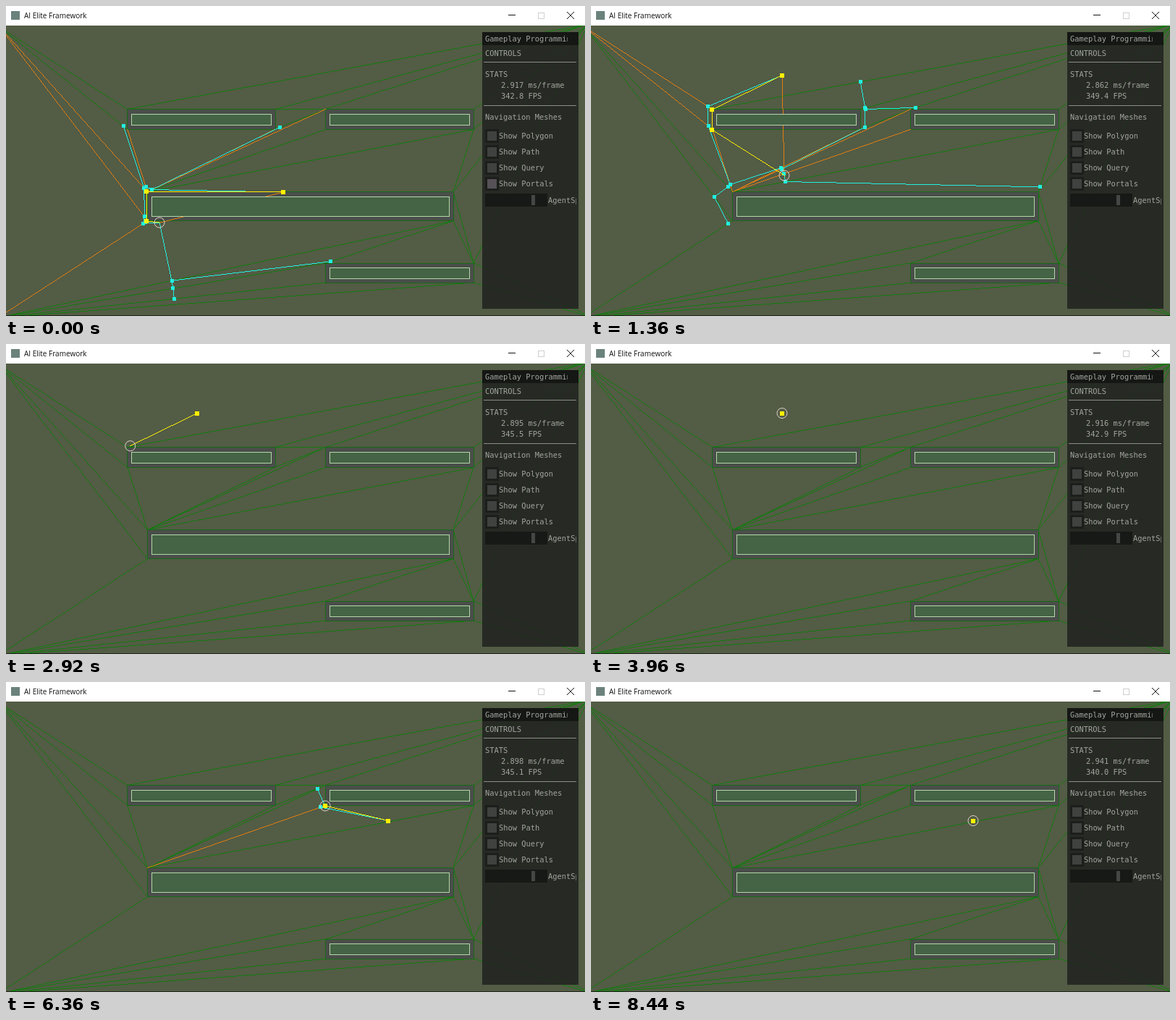
Animation of 800 by 428 pixels, one loop 8.48 s. Source, as an HTML page with a canvas:

```html
<!DOCTYPE html>
<html lang="en">
<head>
<meta charset="utf-8">
<title>AI Elite Framework</title>
<style>
  html, body { margin: 0; width: 100%; height: 100%; overflow: hidden; background: #535c45; }
  canvas { display: block; width: 800px; height: 428px; }
</style>
</head>
<body>
<canvas id="stage" width="800" height="428"></canvas>
<script>
const ctx = document.getElementById('stage').getContext('2d');
const LOOP = 8480, STEP = 40, RADIUS = 7;
const MONO = '10.4px "DejaVu Sans Mono", monospace';
const CYAN = '#20f0e0', YELLOW = '#fff000', ORANGE = '#e07d10', GREEN = '#147a10';

// Navigation mesh: world corners w, obstacle corners a to d, all clockwise from top left
const verts = { w0: [-10, 28], w1: [804, 25], w2: [810, 430], w3: [-10, 430] };
const obstacles = {
  a: [167.5, 142.5, 372, 170], b: [441.5, 142.5, 646, 170.5],
  c: [195.5, 256.5, 618, 296.5], d: [441.5, 355, 646, 382]
};
for (const [k, [l, t, r, b]] of Object.entries(obstacles)) {
  [[l, t], [r, t], [r, b], [l, b]].forEach((p, i) => verts[k + i] = p);
}
const meshEdges = ('w0a0 w0a3 w0c0 w0c3 a0w1 a1w1 a1b0 b0w1 b1w1 b2w1 a2b0 a3c0 c0a2 c0b0 c0b3 c0b2 c1b2 ' +
  'c1w1 c1d1 c2d1 d1w1 d1w2 d2w2 w3c3 w3c2 c2d0 w3d0 w3d3 w3d2 w3w2').split(' ');

// Agent position over time: ms, x, y
const track = [
  [0, 212, 299], [130, 194, 297], [400, 194, 256], [980, 280, 256], [1080, 282, 252],
  [1360, 267, 234], [2200, 204, 190.5], [2600, 167, 171], [2870, 167, 143], [3900, 264, 95.5],
  [4640, 264, 95.5], [5000, 301, 111.5], [6360, 441, 171], [7280, 528, 191.5]
];

// Routes: start, corners with the time they are passed; the last one is the goal
const routes = [
  { start: 0, corners: [[194, 297, 130], [194, 256, 400], [383, 257, LOOP]] },
  { start: 980, corners: [[167, 171, 2600], [167, 143, 2870], [264, 95.5, LOOP]] },
  { start: 4640, corners: [[441, 171, 6380], [528, 191.5, LOOP]] }
];

// Searches: start, crossed edges up to the goal, side branches as "parent:edges"
const searches = [
  [0, 'w3c3 w0c3 w0c0 a3c0 c0a2 c0b0', ':w3c2 w3d0 w3d3', 'w3c2:c2d0', 'w0c0:w0a3', 'c0a2:a2b0'],
  [130, 'w0c0 a3c0 c0a2 c0b0', ':w0c3 w3c3', 'w0c0:w0a3', 'c0a2:a2b0'],
  [400, ''],
  [980, 'c0b2 c0b3 c0b0 c0a2 a3c0 w0a3 w0a0', ':c1b2', 'c0b0:a2b0 a1b0 a1w1 a0w1', 'a1b0:b0w1', 'a3c0:w0c0 w0c3 w3c3'],
  [1160, 'c0b3 c0b0 c0a2 a3c0 w0a3 w0a0', ':c0b2 c1b2', 'c0b0:a2b0 a1b0 a1w1 a0w1', 'a1b0:b0w1', 'a3c0:w0c0 w0c3 w3c3'],
  [1400, 'c0b0 c0a2 a3c0 w0a3 w0a0', ':c0b3 c0b2', 'c0b0:a2b0 a1b0', 'a3c0:w0c0 w0c3'],
  [1500, 'a3c0 w0a3 w0a0', ':c0a2 a2b0', 'a3c0:w0c0 w0c3'],
  [2560, 'w0a3 w0a0', ':w0c0'],
  [2600, 'w0a0', ':w0a3'],
  [2870, ''],
  [4640, 'a0w1 a1w1 a1b0 a2b0 c0b0 c0b3', ':w0a0', 'a1w1:b0w1 b1w1', 'a2b0:c0a2'],
  [5140, 'a1w1 a1b0 a2b0 c0b0 c0b3', ':a0w1', 'a1w1:b0w1 b1w1', 'a2b0:c0a2'],
  [5720, 'a2b0 c0b0 c0b3', ':a1b0', 'a2b0:c0a2'],
  [6040, 'c0b3', ':c0b0'],
  [6380, '']
];

// Frame time readings: ms, milliseconds per frame
const readings = [[0, 2.917], [1360, 2.862], [2200, 2.88], [3960, 2.916], [5000, 2.914], [6360, 2.898], [8440, 2.941]];

const ends = e => [verts[e.slice(0, 2)], verts[e.slice(2)]];
const words = s => s.split(' ').filter(Boolean);
const latest = (list, t, at) => list.filter(x => at(x) <= t).pop();

function sample(keys, t) {
  const i = keys.findIndex(k => k[0] > t);
  if (i < 0) return keys[keys.length - 1].slice(1);
  const a = keys[i - 1], b = keys[i], f = (t - a[0]) / (b[0] - a[0]);
  return a.slice(1).map((v, j) => v + (b[j + 1] - v) * f);
}

// Nearest point on an edge, kept one agent radius away from its ends
function nearest(p, edge) {
  const [a, b] = ends(edge), dx = b[0] - a[0], dy = b[1] - a[1], len = Math.hypot(dx, dy);
  const along = ((p[0] - a[0]) * dx + (p[1] - a[1]) * dy) / len;
  const f = Math.min(Math.max(along, RADIUS), len - RADIUS) / len;
  return [a[0] + dx * f, a[1] + dy * f];
}

function rect(x, y, w, h, color) {
  ctx.fillStyle = color;
  ctx.fillRect(x, y, w, h);
}
function frame(l, t, r, b, color) {
  ctx.strokeStyle = color;
  ctx.strokeRect(l + .5, t + .5, r - l, b - t);
}
// Hard-edged polyline without smoothing
function line(color, ...pts) {
  ctx.fillStyle = color;
  ctx.beginPath();
  for (let i = 1; i < pts.length; i++) {
    const [x, y] = pts[i - 1], dx = pts[i][0] - x, dy = pts[i][1] - y;
    const n = Math.max(1, Math.ceil(Math.max(Math.abs(dx), Math.abs(dy))));
    for (let k = 0; k <= n; k++) {
      ctx.rect(Math.floor(x + dx * k / n), Math.floor(y + dy * k / n), 1, 1);
    }
  }
  ctx.fill();
}
function dot([x, y], size, color) {
  rect(Math.round(x - size / 2), Math.round(y - size / 2), size, size, color);
}
function text(s, x, y, color = '#a2a59e', font = MONO) {
  ctx.font = font;
  ctx.fillStyle = color;
  ctx.fillText(s, x, y);
}
function clipped(x, y, w, h, draw) {
  ctx.save();
  ctx.beginPath();
  ctx.rect(x, y, w, h);
  ctx.clip();
  draw();
  ctx.restore();
}

function drawObstacles(draw) {
  for (const [l, t, r, b] of Object.values(obstacles)) draw(...[l, t, r, b].map(Math.floor));
}
function drawCores() {
  for (const [l, t, r, b] of Object.values(obstacles)) {
    const box = [l + 5.5, t + 6.5, r - 5.5, b - 6].map(Math.floor);
    rect(box[0], box[1], box[2] - box[0], box[3] - box[1], '#456345');
    frame(...box, '#b4d6aa');
  }
}

function drawWorld(t) {
  const agent = sample(track, t);
  const route = latest(routes, t, r => r.start);
  const [, main, ...sides] = latest(searches, t, s => s[0]);
  const corners = route.corners.filter(c => c[2] > t);
  const goal = corners[corners.length - 1];
  const arrived = Math.hypot(goal[0] - agent[0], goal[1] - agent[1]) < 1;

  rect(0, 26, 800, 402, '#535c45');
  drawObstacles((l, top, r, b) => rect(l, top, r - l, b - top, '#4a4e4a'));
  meshEdges.forEach(e => line(GREEN, ...ends(e)));
  drawObstacles((l, top, r, b) => frame(l, top, r, b, '#176a17'));
  if (!arrived) {
    words(main).forEach(e => line(ORANGE, ...ends(e)));
    line(ORANGE, agent, goal);
  }
  drawCores();

  if (!arrived) {
    const nodes = { '': agent };
    const grow = (from, edges) => edges.reduce((p, e) => {
      const n = nodes[e] = nearest(p, e);
      line(CYAN, p, n);
      return n;
    }, nodes[from]);
    line(CYAN, grow('', words(main)), goal);
    for (const side of sides) {
      const [from, edges] = side.split(':');
      grow(from, words(edges));
    }
    Object.values(nodes).forEach(n => n !== agent && dot(n, 5, CYAN));
    line(YELLOW, agent, ...corners);
  }
  corners.forEach(c => dot(c, 6, YELLOW));
  ctx.strokeStyle = '#e2d2cf';
  ctx.beginPath();
  ctx.arc(agent[0], agent[1], RADIUS, 0, 7);
  ctx.stroke();
  rect(0, 427, 800, 1, '#23261f');
}

function drawPanel(t) {
  const ms = sample(readings, t)[0];
  rect(658, 36, 133, 382, 'rgba(32,34,31,.86)');
  rect(658, 36, 133, 18, '#151714');
  clipped(658, 36, 118, 18, () => text('Gameplay Programming', 662, 49));
  text('CONTROLS', 662, 69);
  rect(660, 77, 128, 1, '#8b8e87');
  text('STATS', 662, 98);
  text(ms.toFixed(3) + ' ms/frame', 684, 113);
  text((1000 / ms).toFixed(1) + ' FPS', 684, 128);
  rect(660, 137, 128, 1, '#8b8e87');
  text('Navigation Meshes', 662, 157);
  ['Polygon', 'Path', 'Query', 'Portals'].forEach((name, i) => {
    const y = Math.round(170 + i * 22.1), hover = i === 3 && t < 400;
    rect(662, y, 19, 19, '#1c1e1b');
    rect(665, y + 3, 13, 13, hover ? '#565156' : '#40423f');
    text('Show ' + name, 681, y + 13);
  });
  rect(662, 259, 86, 18, '#171916');
  rect(726, 261, 5, 14, '#454744');
  clipped(740, 259, 48, 18, () => text('AgentSpeed', 749, 272));
}

function drawTitle() {
  rect(0, 0, 800, 27, '#fff');
  rect(7, 7, 12, 12, '#6b827c');
  text('AI Elite Framework', 25, 17, '#111', '10px "Open Sans", "Noto Sans", sans-serif');
  rect(694, 12, 10, 1, '#111');
  frame(735, 9, 743, 17, '#cfcfcf');
  line('#111', [775, 8], [784, 17]);
  line('#111', [784, 8], [775, 17]);
}

let shown = -1;
function tick(now) {
  const t = Math.floor(now % LOOP / STEP) * STEP;
  if (t !== shown) {
    shown = t;
    ctx.lineWidth = 1;
    drawWorld(t);
    drawPanel(t);
    drawTitle();
  }
  requestAnimationFrame(tick);
}
tick(0);
</script>
</body>
</html>
```
